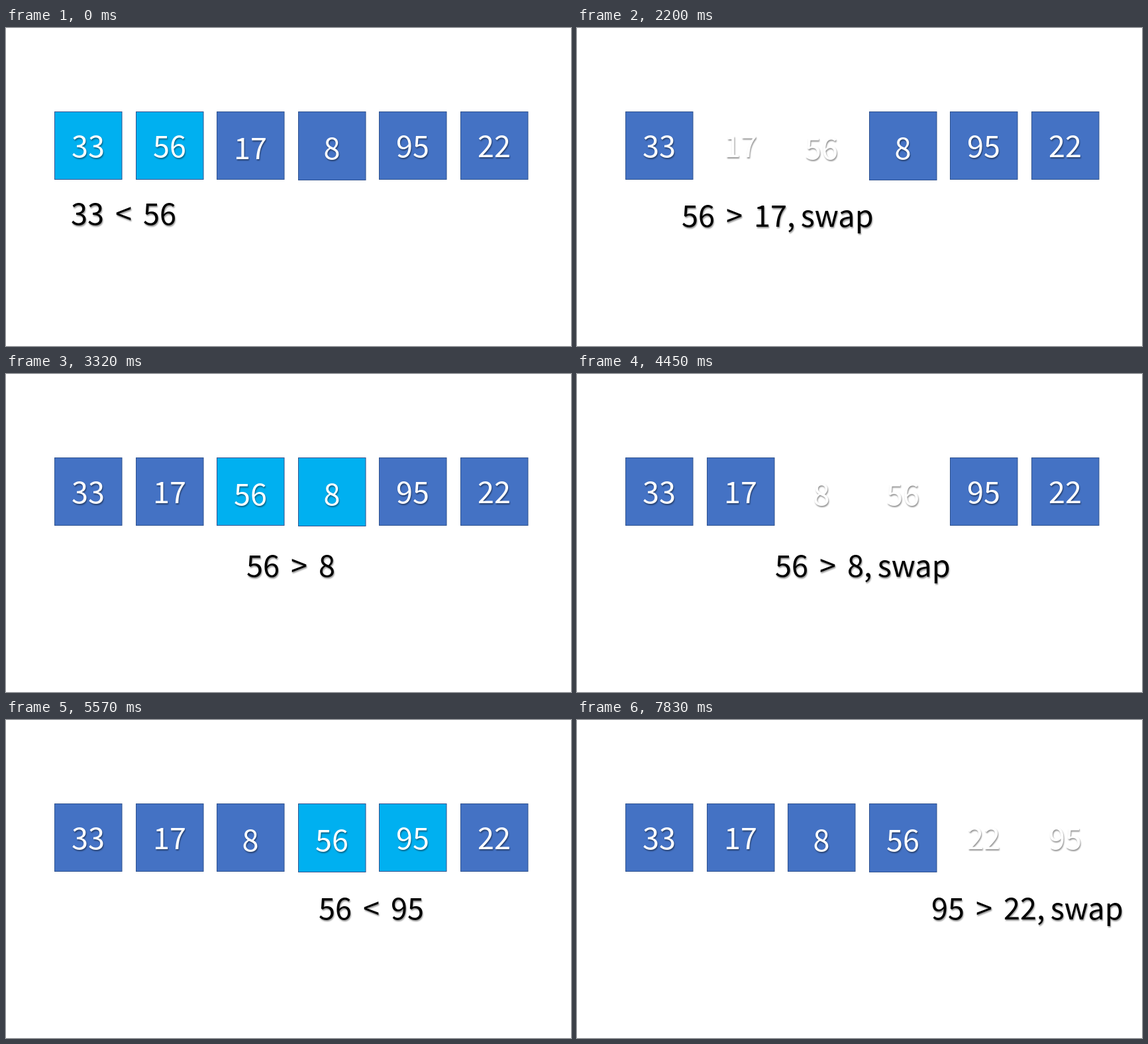
Write an HTML page that moves like this. It is 853 px wide and 480 px high and loops after 8 s.

```html
<!DOCTYPE html>
<html lang="en">
<head>
<meta charset="utf-8">
<title>Bubble sort</title>
<style>
html, body { margin: 0; width: 100%; height: 100%; overflow: hidden; background: #fff; }
svg { display: block; }
text {
  font: 300 45px "Noto Sans CJK SC", "Noto Sans CJK JP", "Noto Sans", sans-serif;
  text-shadow: 1px 2px 2px rgba(0, 0, 0, .42);
  white-space: pre;
}
rect { stroke: #2f528f; }
.number { fill: #fff; text-anchor: middle; }
#note { word-spacing: 7px; }
#tail { word-spacing: -2px; }
</style>
</head>
<body>
<svg width="853" height="480" viewBox="0 0 853 480">
  <g id="boxes"></g>
  <text id="note"><tspan id="compare"></tspan><tspan id="tail"></tspan></text>
</svg>
<script>
const LOOP = 8000, DARK = "#4472c4", LIGHT = "#00b0f0";
const start = [33, 56, 17, 8, 95, 22];
const first = [33, 17, 56, 8, 95, 22];
const second = [33, 17, 8, 56, 95, 22];
const third = [33, 17, 8, 56, 22, 95];

// time, numbers, left box of the active pair, note, note x, note y, swapped, boxes hidden
const steps = [
  [0, start, 0, "33 < 56", 98, 297],
  [1070, start, 1, "56 > 17", 221, 297],
  [2200, first, 1, "56 > 17", 158, 300, true, true],
  [2660, first, 1, "56 > 17", 158, 300, true],
  [3320, first, 2, "56 > 8", 363, 306],
  [4450, second, 2, "56 > 8", 299, 306, true, true],
  [4910, second, 2, "56 > 8", 299, 306, true],
  [5570, second, 3, "56 < 95", 472, 301],
  [6700, second, 4, "95 > 22", 584, 301],
  [7830, third, 4, "95 > 22", 535, 301, true, true]
];

const $ = id => document.getElementById(id);

function add(name, attrs) {
  const el = document.createElementNS("http://www.w3.org/2000/svg", name);
  for (const key in attrs) el.setAttribute(key, attrs[key]);
  return $("boxes").appendChild(el);
}

const boxes = start.map((_, i) => {
  const x = Math.round(73 + 122.6 * i) + .5;
  const middle = i === 2 || i === 3;
  return {
    rect: add("rect", { x, y: 126.5, width: 101.5, height: i === 3 ? 103 : 102 }),
    label: add("text", { x: x + 50.5, y: middle ? 198 : 195, class: "number" })
  };
});

let shown;
function draw(step) {
  const [, numbers, pair, note, x, y, swapped, hidden] = step;
  boxes.forEach(({ rect, label }, i) => {
    const active = i === pair || i === pair + 1;
    rect.setAttribute("fill", active ? LIGHT : DARK);
    rect.setAttribute("visibility", active && hidden ? "hidden" : "visible");
    label.textContent = numbers[i];
  });
  $("note").setAttribute("x", x);
  $("note").setAttribute("y", y);
  $("compare").textContent = note;
  $("tail").textContent = swapped ? ", swap" : "";
}

function frame() {
  const t = performance.now() % LOOP;
  const step = steps.findLast(s => s[0] <= t);
  if (step !== shown) draw(shown = step);
  requestAnimationFrame(frame);
}
frame();
</script>
</body>
</html>
```
